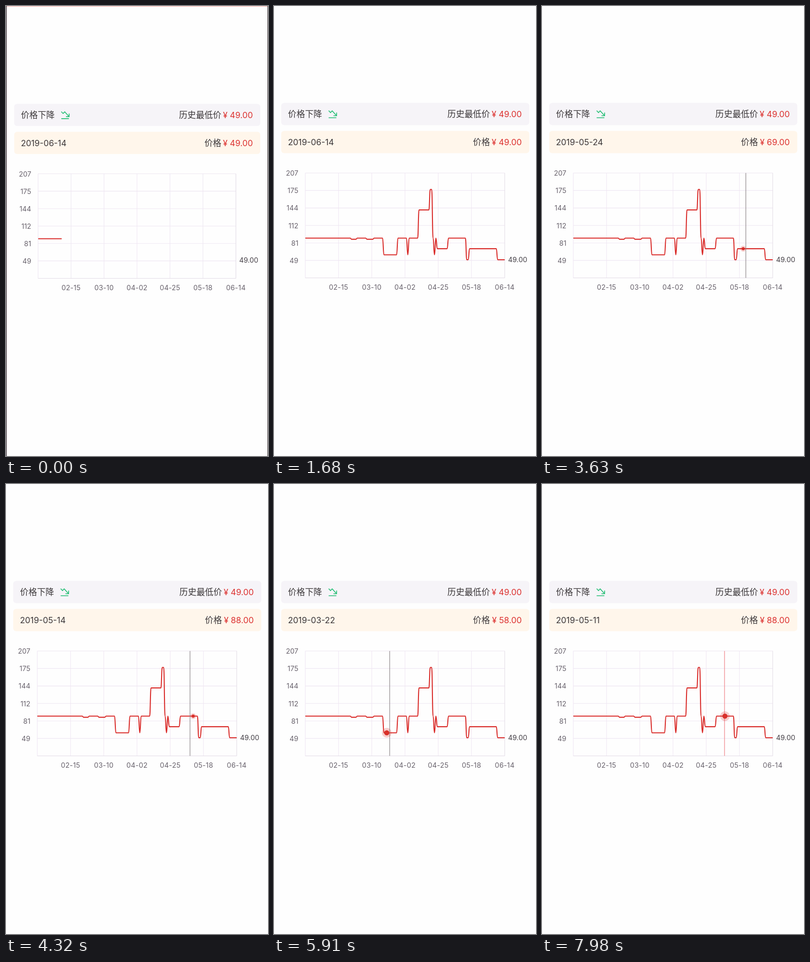
An HTML page for the animation above (8000 ms loop, 544 px wide and 931 px high).

```html
<!DOCTYPE html>
<html lang="zh-CN">
<head>
<meta charset="utf-8">
<style>
html, body { margin: 0; width: 100%; height: 100%; overflow: hidden; background: #fefefe; }
svg { display: block; width: 100vw; height: 100vh; }
text { font-family: Inter, "Noto Sans CJK SC", "Noto Sans CJK", sans-serif; fill: #3b3739; }
.row { font-size: 17.4px; }
.cjk { font-family: "Noto Sans CJK SC", "Noto Sans CJK", sans-serif; font-size: 17.7px; }
.red { fill: #dc3230; }
.end { text-anchor: end; }
.axis { font-size: 14.4px; fill: #68626c; }
.mid { text-anchor: middle; letter-spacing: .2px; }
</style>
</head>
<body>
<svg viewBox="0 0 544 931" preserveAspectRatio="none">
  <defs><clipPath id="clip"><rect id="reveal" x="65" y="330" height="250"/></clipPath></defs>
  <g id="page">
    <rect x="15" y="200.5" width="515" height="46" rx="6" fill="#f6f4f8"/>
    <rect x="15" y="258.5" width="515" height="46" rx="6" fill="#fff6eb"/>
    <text class="cjk" x="29" y="230.3">价格下降</text>
    <path d="M113.5 216.5L117.3 220.5L120.8 217L129.5 226.5M123.5 227H130V220.5M113.5 231.2H129.5" fill="none" stroke="#20bd72" stroke-width="1.6"/>
    <text class="cjk end" x="448.5" y="230.3">历史最低价</text>
    <text class="row red end" x="514.5" y="230.3">¥ 49.00</text>
    <text class="row" id="date" x="29" y="288.3"></text>
    <text class="cjk end" x="448.5" y="288.3">价格</text>
    <text class="row red end" id="price" x="514.5" y="288.3"></text>
    <g id="grid"></g>
    <path id="line" clip-path="url(#clip)" fill="none" stroke="#d92b29" stroke-width="2.1" stroke-linejoin="round"/>
    <text class="axis" x="486" y="530" style="fill:#454047">49.00</text>
    <g id="cursor">
      <path id="hair" stroke-width="1.2"/>
      <circle id="halo" fill="#e0302c" fill-opacity=".23"/>
      <circle id="dot" fill="#d8302a"/>
    </g>
  </g>
  <g id="edges">
    <path d="M0 .5H544" stroke="#f6a49c"/>
    <path d="M.7 0V931" stroke="#4a4046" stroke-width="1.4"/>
    <path d="M543.5 0V931" stroke="#33282c"/>
  </g>
</svg>
<script>
const $ = id => document.getElementById(id);
const clamp = v => Math.max(0, Math.min(1, v));
const LOOP = 8000, LEFT = 65, RIGHT = 479, TOP = 345.5, ROW = 36.17, DAYS = 142, LAG = 22;
const dayX = d => LEFT + d * (RIGHT - LEFT) / DAYS;
const priceY = p => 525 - (p - 49) * 1.146;

// [first day, price] of each run of equal prices
const runs = [[0, 88], [33, 86], [37, 88], [44, 86], [49, 88], [56, 58], [66, 88], [73, 58], [74, 88],
  [81, 139], [89, 176], [91, 88], [92, 58], [93, 88], [94, 69], [102, 88], [115, 49], [117, 69], [137, 49]];
const priceOn = day => runs.filter(r => r[0] <= day).pop()[1];

// finger path: [ms, x, px per ms]
const drag = [[1800, 400, 0], [2600, 110, 0], [3630, 423, .26], [3950, 460, 0], [4980, 156, -.14],
  [5300, 128, 0], [5910, 240, .22], [6960, 373, .01], [7350, 379, 0], [LOOP, 379, 0]];

function fingerX(t) {
  t = Math.max(t, drag[0][0]);
  const i = Math.max(1, drag.findIndex(k => k[0] >= t));
  const [t0, x0, v0] = drag[i - 1], [t1, x1, v1] = drag[i];
  const h = t1 - t0, u = (t - t0) / h, w = 1 - u;
  return w * w * ((1 + 2 * u) * x0 + u * h * v0) + u * u * ((3 - 2 * u) * x1 - w * h * v1);
}

function buildChart() {
  let grid = '';
  const rule = (d, color) => grid += `<path d="${d}" stroke="${color}" stroke-width="1.1"/>`;
  const label = (cls, x, y, s) => grid += `<text class="axis ${cls}" x="${x}" y="${y}">${s}</text>`;
  const dates = ['02-15', '03-10', '04-02', '04-25', '05-18', '06-14'];
  [207, 175, 144, 112, 81, 49].forEach((n, i) => label('end', 50.5, TOP + i * ROW + 5.6, n));
  for (let i = 0; i < 7; i++) {
    const x = LEFT + i * 69, y = TOP + i * ROW;
    rule(`M${LEFT} ${y}H${RIGHT}`, i === 6 ? '#e2dbe6' : '#eee6f2');
    rule(`M${x} ${TOP}V${TOP + 6 * ROW}`, i === 6 ? '#e2dbe6' : '#eee6f2');
    if (i) label('mid', x, 586.8, dates[i - 1]);
  }
  $('grid').innerHTML = grid;

  let path = `M${LEFT} ${priceY(88)}`;
  runs.slice(1).forEach(([day, price], i) => {
    const x0 = dayX(day - 1), x1 = dayX(day), y0 = priceY(runs[i][1]), y1 = priceY(price);
    path += `L${x0} ${y0}C${x0 + 1.5} ${y0} ${x1 - 1.5} ${y1} ${x1} ${y1}`;
  });
  $('line').setAttribute('d', path + `H${RIGHT}`);
}

function setDot(id, x, y, r) {
  $(id).setAttribute('cx', x);
  $(id).setAttribute('cy', y);
  $(id).setAttribute('r', r);
}

function draw(t) {
  const away = Math.pow(1 - clamp((t - 60) / 500), 3);
  const sx = 1 - .008 * away, sy = 1 - .003 * away;
  $('page').setAttribute('transform', `matrix(${sx} 0 0 ${sy} ${272 * (1 - sx)} ${2.6 * away})`);
  $('edges').setAttribute('opacity', away);
  $('reveal').setAttribute('width', (RIGHT - LEFT + 1) * Math.min(1, .118 + t / 1000));

  const touching = t >= drag[0][0];
  const day = touching ? Math.round((fingerX(t - LAG) - LEFT) / (RIGHT - LEFT) * DAYS) : DAYS;
  const price = priceOn(day);
  $('date').textContent = new Date(Date.UTC(2019, 0, 23 + day)).toISOString().slice(0, 10);
  $('price').textContent = `¥ ${price}.00`;
  $('cursor').setAttribute('visibility', touching ? 'visible' : 'hidden');
  if (!touching) return;

  const x = fingerX(t), speed = Math.abs(x - fingerX(t - 5)) / 5;
  const r = 5.3 - 2.1 * clamp((speed - .225) / .03);
  $('hair').setAttribute('d', `M${x} ${TOP}V${TOP + 6 * ROW}`);
  $('hair').setAttribute('stroke', speed > .02 ? '#8c8688' : '#ee7f84');
  setDot('halo', dayX(day), priceY(price), r * 1.9);
  setDot('dot', dayX(day), priceY(price), r);
}

function tick() {
  draw(performance.now() % LOOP);
  requestAnimationFrame(tick);
}
buildChart();
tick();
</script>
</body>
</html>
```
